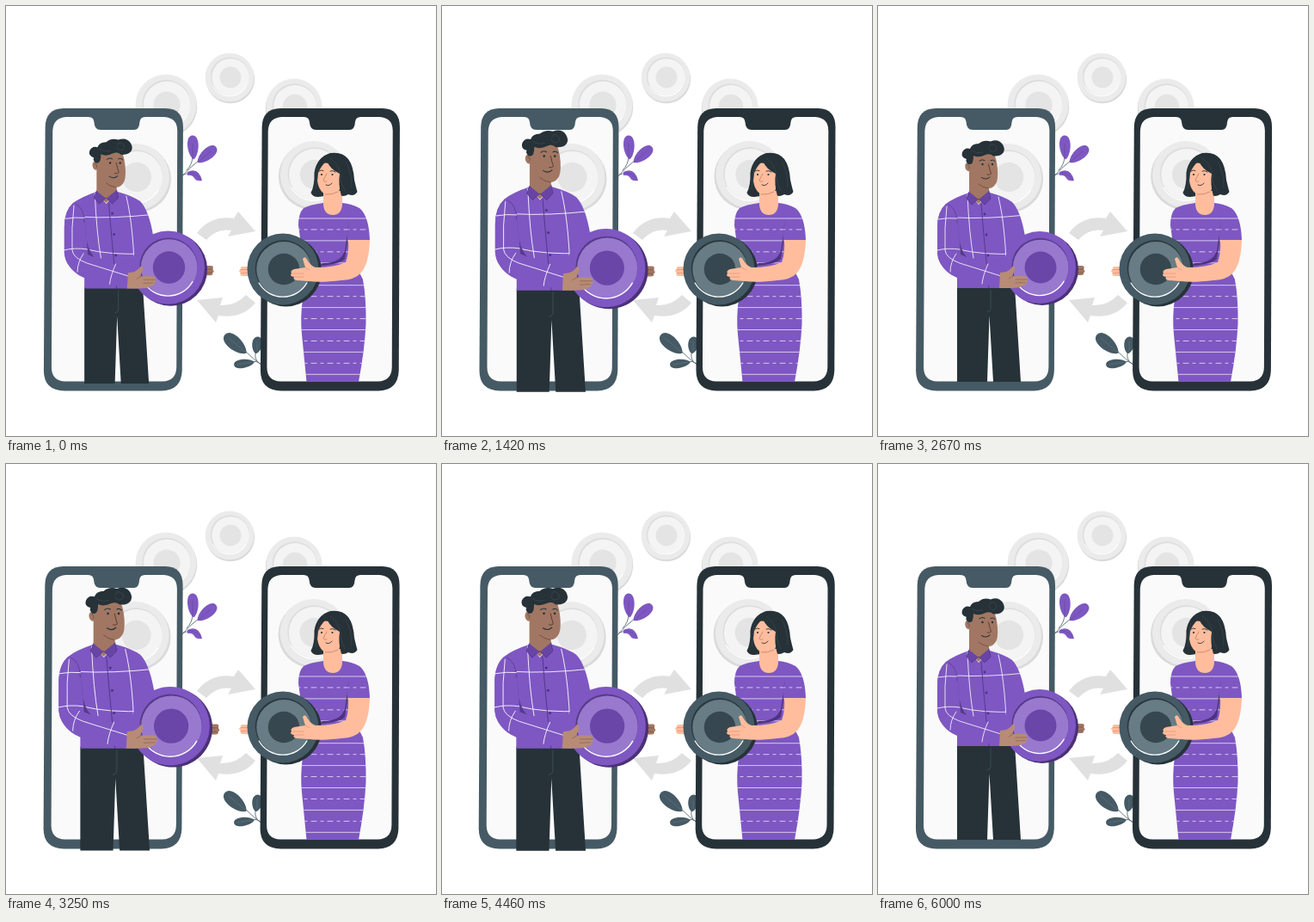
Animation of 500x500 px, one loop 6040 ms. Source, as an HTML page:

```html
<!DOCTYPE html>
<html lang="en">
<head>
<meta charset="utf-8">
<title>Coin exchange</title>
<style>
  html, body { margin: 0; width: 100%; height: 100%; overflow: hidden; background: #fff; }
  svg { display: block; width: 100vw; height: 100vh; }
  .line { fill: none; stroke-linecap: round; stroke-linejoin: round; }
</style>
</head>
<body>
<script>
const PURPLE = '#7e57c2', INK = '#263238', SLATE = '#455a64', GREY = '#e0e0e0';
const BROWN = '#a17763', TAN = '#b78b76', PEACH = '#ffbd9d';

const fill = (color, d, extra = '') => `<path fill="${color}" d="${d}" ${extra}/>`;
const line = (color, width, d, extra = '') =>
  `<path class="line" stroke="${color}" stroke-width="${width}" d="${d}" ${extra}/>`;
const disc = (color, x, y, r) => `<circle fill="${color}" cx="${x}" cy="${y}" r="${r}"/>`;
const oval = (color, x, y, rx, ry, angle) =>
  `<ellipse fill="${color}" cx="${x}" cy="${y}" rx="${rx}" ry="${ry}" transform="rotate(${angle} ${x} ${y})"/>`;

// Leaf with a round tip that narrows toward its stem, pointing along the angle.
const leaf = (color, x, y, long, wide, angle) =>
  fill(color, `M${-long} 0C${-long * .6} ${-wide * 1.3} ${long} ${-wide * 1.6} ${long} 0S${-long * .6} ${wide * 1.3} ${-long} 0Z`,
    `transform="translate(${x} ${y}) rotate(${angle})"`);

// Coin with side wall, raised rim, lit lower edge and a plain centre mark.
function coin(x, y, r, dx, [side, front, edge, inner, mark]) {
  const q = r * .77, a = q * .87;
  return disc(side, x + dx, y + 2, r) + disc(front, x, y, r) +
    disc(edge, x + .5, y - 1, q + .8) + disc(inner, x + 1.2, y, q) +
    line('#fff', r / 32, `M${x - a} ${y + q * .5}A${q} ${q} 0 0 0 ${x + a} ${y + q * .5}`) +
    disc(mark, x + 1, y, r * .44);
}
const PALE = ['#dadada', '#ebebeb', '#dedede', '#f4f4f4', '#e4e4e4'];

const phone = (color, dx, screenDx) => `<g transform="translate(${dx})">` +
  fill(color, 'M67 119H186Q206 119.5 206 141L204.8 424Q204 447 181 447.5H68Q44 447 44 424L45.7 141Q46 119.5 67 119Z') +
  fill('#fafafa', 'M70 129H96Q102 129 102.5 135Q103 144 110 144H149Q155 144 155.5 135Q156 129 162 129H184Q199.3 130 199.3 145L198.3 420Q198 436 182 436.5H69Q53 436 53 420L54.3 145Q55 130 70 129Z',
    `transform="translate(${screenDx})"`) +
  '</g>';

const arrows =
  fill(GREY, 'M222 264Q238 243 265 247L270 239L290 262L258 268L262 261Q245 258 233 272Z') +
  fill(GREY, 'M222 342L252 339L249 348Q267 349 279 336L290 345Q275 364 247 360L244 368Z');

const plants =
  line(SLATE, .8, 'M204 199Q213 188 225 179M210 191Q217 184 217 175M206 196Q211 194 214 195') +
  leaf(PURPLE, 217.5, 164.5, 14, 5.8, -93) + leaf(PURPLE, 233.5, 173, 14, 6, -40) +
  fill(PURPLE, 'M211 193Q224 187 228 203Q221 204 219 200Q216 196 211 197Z') +
  line(INK, .5, 'M217 177V160M224 181L238 169M213 194Q221 194 226 201', 'opacity=".4"') +
  line(SLATE, .8, 'M299 419Q288 411 279 402M292 413Q288 407 291 402M296 416Q291 412 287 414') +
  leaf(SLATE, 267, 393, 16.5, 7.3, 221) + leaf(SLATE, 292, 394.5, 10, 5.5, -80) +
  leaf(SLATE, 277, 415.7, 12, 4.7, 172) +
  line('#90a4ae', .5, 'M259 386L278 402M292 390V401M269 417L286 414', 'opacity=".5"');

const manHead =
  fill(BROWN, 'M107 180L110 172H135Q138 178 139 190Q140 204 136 208Q133 212 129 212L129 218L117 230L106 219V194Z') +
  oval(BROWN, 105, 187, 3.7, 5.2, -10) +
  line('#6f4b3d', .8, 'M104 185Q107 185 106 189M117 207Q121 211 128 212') +
  fill(INK, 'M105 184Q101 180 103 178Q96 176 98 170Q101 164 107 166Q109 160 117 160Q123 155 131 157.5Q140 154 145 161Q148 166 146 170Q143 175 134 174.5Q130 171 125 173Q117 177 111 174Q111 184 107 184Z') +
  line('#5b6a70', .6, 'M130 164Q130 160 134 161Q141 165 136 169Q131 171 129 166M109 168Q114 172 122 170', 'opacity=".5"') +
  disc(INK, 121.5, 184, 1.2) + disc(INK, 133, 184, 1.2) +
  line(INK, 1, 'M118 180Q121 177.5 124 179.5M131 179.5Q134 178 136 180.5M120.5 199.5Q126 203 130 199') +
  line('#5a3a2e', .9, 'M128.5 184Q130 191 131.5 195Q130 197 127 196');

const TORSO = 'M106 217Q88 223 79 230Q69 239 69 257L69 287Q71 304 86 313L92 316V328H159V300L171 268Q166 238 156 228Q148 222 130 217L117 231Z';
const SLEEVE = 'M79 230Q69 239 69 257V288Q70 301 81 307Q105 320 141 328L145 304Q116 299 96 289Q94 260 92 242Q89 230 79 230Z';
const man =
  fill(INK, 'M92 326H159L166 437H134L129.5 360L127 437H92Z') +
  line('#546a74', .7, 'M131 330V352Q131 355 127 356', 'opacity=".65"') +
  fill(BROWN, 'M227 302H238Q241 303 239 306Q242 309 239 310Q240 313 236 313H227Z') +
  line('#6f4b3d', .6, 'M232 306H239M232 310H238') +
  fill(PURPLE, TORSO) + `<clipPath id="shirt"><path d="${TORSO}"/></clipPath>` +
  '<g clip-path="url(#shirt)">' +
  line('#f3edfb', .9, 'M104 219Q106 265 111 293M140 222Q149 258 150 328M90 246Q125 248 172 243M94 283Q122 290 163 288M112 316Q130 319 160 318') +
  '</g>' +
  line('#4d3380', .8, 'M120 230Q123 270 129 328') +
  [[124, 242], [126, 266], [128, 290]].map(([x, y]) => disc('#4d3380', x, y, 1.4)).join('') +
  fill(PURPLE, SLEEVE) +
  fill('#563b88', 'M92 242Q94 266 96 289L103 292Q95 282 94 268Z') +
  line('#563b88', .7, 'M82 231Q92 236 92 252') +
  line('#f3edfb', .9, 'M80 233Q77 258 78 284Q79 293 95 299L143 314M70 248Q82 246 92 247M69 284Q81 281 95 283M91 288Q84 298 84 309M128 300Q122 313 121 323') +
  manHead +
  fill('#6845a5', 'M106 216L103 224L109 231L117 224L124 231L131 224L129 215L117 225Z') +
  line('#4d3380', .7, 'M106 216L103 224L109 231L117 224L124 231L131 224L129 215') +
  coin(188, 304, 42, 3, ['#4b3175', PURPLE, '#573b88', '#9879ce', '#6946a8']) +
  fill(TAN, 'M142 310L149 309Q155 306 156 303Q160 302 159 307L156 314L171 314Q175 315 173 317.5Q176 320 172 321.5Q174 324 169 325Q166 328 154 328H141Z') +
  line('#805c4d', .6, 'M160 318H173M160 322L171 321.5M157 314L152 317');

const DRESS = 'M369 229Q353 231 346 235Q340 241 340 255L344 285L350 310L345 340Q342 363 344 382L349.5 437H410Q417 400 418.5 370Q419 340 415 318L406 300L398 272H423Q422 244 411 235Q402 230 391 229Z';
const stripes = Array.from({length: 15}, (_, k) =>
  line('#f4effc', .75, `M336 ${247 + 12.95 * k}H426`, k % 2 ? 'stroke-dasharray="6 5 3 5"' : '')).join('');
const womanHead =
  fill(INK, 'M377 171Q391 169 398 178Q404 186 405 202Q407 211 408.5 216Q405 222 398 219Q392 223 385 219L363 222Q356 222 354.5 217Q359 209 358.5 194Q361 176 377 171Z') +
  fill(PEACH, 'M369 214V231Q370 243 380 243Q390 243 391 231V215Z') +
  fill(PEACH, 'M364 184Q371 181 379 184Q385 190 388 195V213Q386 220 375 220Q364 218 362 203Z') +
  fill(INK, 'M362 197Q365 187 373 180Q377 190 388 195Q386 207 390 221L400 213L394 178L377 174L364 180Z') +
  line('#52636b', .6, 'M377 177Q388 184 389 199Q390 208 394 215M395 181Q402 192 402 211M360 212Q363 199 363 189', 'opacity=".5"') +
  disc(INK, 367, 196, 1.1) + disc(INK, 379.5, 196, 1.1) +
  line(INK, .9, 'M364 192Q366 190 369 191.5M377 192Q380 190.5 383 193M372 208Q376 210 379 206') +
  line('#c77e64', .8, 'M373 195Q370 200 369 203Q370 205 373 204M371 219Q379 220 386 216');

const woman =
  fill(PEACH, 'M286 303H275Q272 304 273 306Q269 308 273 310Q271 313 275 314H286Z') +
  line('#d9886d', .6, 'M273 306.5H281M273 310.5H281') +
  fill(PURPLE, DRESS) +
  `<clipPath id="dress"><path d="${DRESS}"/></clipPath>` +
  `<g clip-path="url(#dress)">${stripes}</g>` +
  fill('#4d3380', 'M399 250Q396 264 397 274L394 294Q389 300 366 302L368 299Q394 299 395 278Z') +
  womanHead +
  coin(322, 306, 41.5, 3.5, [INK, SLATE, '#29383f', '#677c85', '#37474f']) +
  fill(PEACH, 'M398 272H423Q422 301 412 311Q406 318 390 319Q366 322 352 320L338 319Q333 318 335 315Q329 314 332 311Q330 308 335 306L348 304L345 294Q348 290 350 295Q354 302 360 304Q382 304 395 298Q399 287 398 272Z') +
  line('#d9886d', .6, 'M334 311H346M336 315H346M348 304L353 307');

document.body.innerHTML = `<svg viewBox="0 0 500 500">
  ${coin(186, 115, 35.5, .8, PALE)}${coin(260, 83, 28.3, .8, PALE)}${coin(335, 117, 32.5, -.8, PALE)}
  ${arrows}${plants}
  <g id="phones">
    ${phone(SLATE, 0, 0)}${phone(INK, 252, -1.5)}
    ${coin(151, 199, 39, 2, PALE)}${coin(358, 196, 39, -2, PALE)}
  </g>
  <g id="woman">${woman}</g>
  <g id="man">${man}</g>
</svg>`;

// Piecewise linear value through [position, value] stops.
function ramp(stops, p) {
  const i = stops.findIndex(s => s[0] > p);
  const [a, u] = stops[i - 1], [b, v] = stops[i];
  return u + (v - u) * (p - a) / (b - a);
}
const BEAT = [[0, 1], [.1, 1.1], [.3, 1], [.4, 1], [.5, 1.1], [.6, 1], [1, 1]];
const SHAKE = [0, -1, 2, -4, 4, -4, 4, -4, 2, -1, 0].map((x, i) => [i / 10, x]);

const part = id => document.getElementById(id);
function pulse(id, x, y, time) {
  const s = ramp(BEAT, (time + 3000) % 3000 / 3000);
  part(id).setAttribute('transform', `translate(${x} ${y}) scale(${s}) translate(${-x} ${-y})`);
}

const start = performance.now();
function draw() {
  const p = (performance.now() - start + 40) % 6040 / 6040;
  const time = p * 6000;
  part('phones').setAttribute('transform', `translate(${ramp(SHAKE, p)})`);
  pulse('man', 154.5, 296.5, time);
  pulse('woman', 347, 304, time - 500);
  requestAnimationFrame(draw);
}
draw();
</script>
</body>
</html>
```
